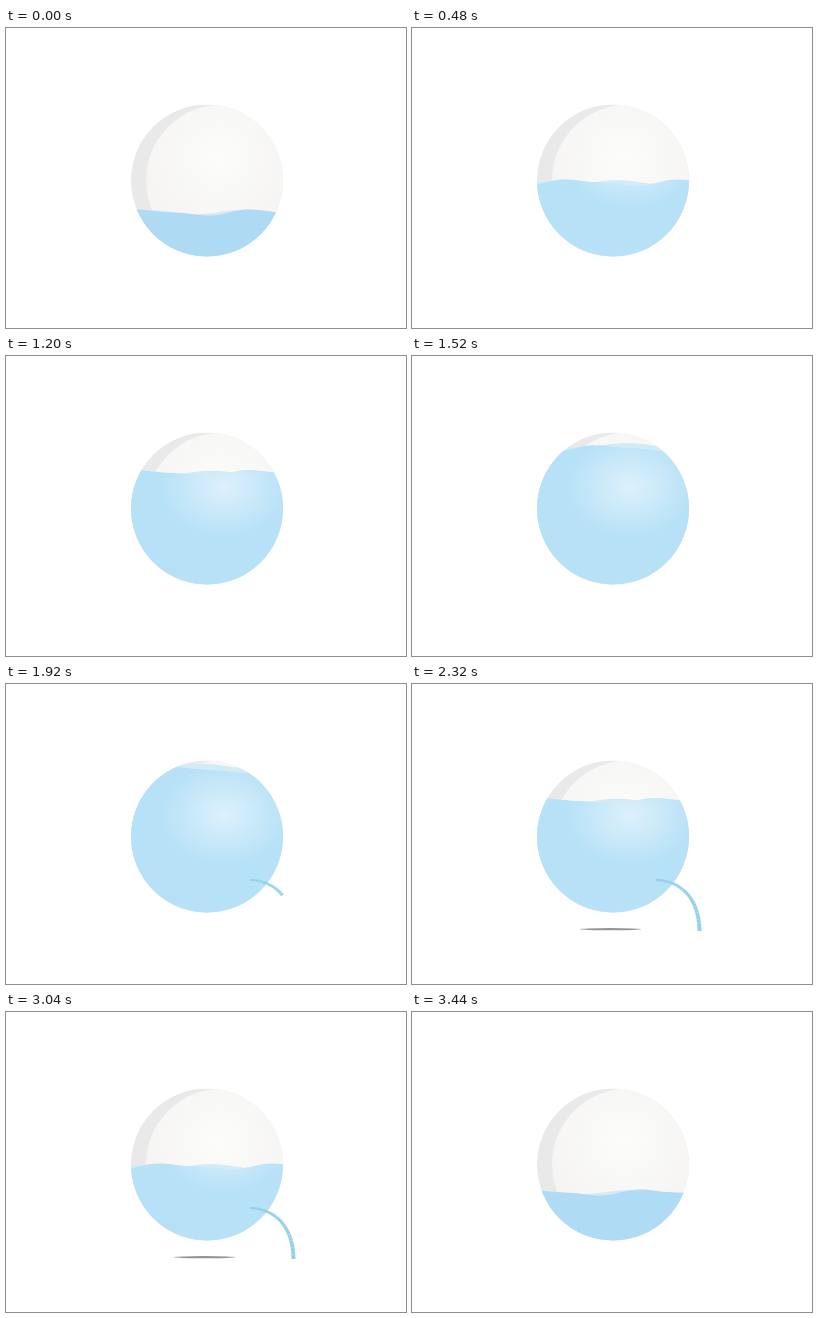
An HTML page with a canvas that plays this animation: 400x300 px, repeating every 3.52 s.

```html
<!DOCTYPE html>
<html lang="en">
<head>
<meta charset="utf-8">
<title>Filling globe</title>
<style>
  html, body { margin: 0; width: 100%; height: 100%; overflow: hidden; background: #fff; }
  canvas { display: block; width: 400px; height: 300px; }
</style>
</head>
<body>
<canvas id="stage" width="400" height="300"></canvas>
<script>
const ctx = document.getElementById('stage').getContext('2d');
const LOOP = 3520, STEP = 80;
const CX = 201, CY = 152.5, R = 76;
const LEVELS = [[0, 184.5], [80, 180.5], [480, 154.5], [1200, 117], [1600, 86], [1680, 78], [1760, 70]];

const clamp = (v) => Math.max(0, Math.min(1, v));
const mix = (a, b, k) => a + (b - a) * k;

function levelAt(p) {
  for (let i = 1; i < LEVELS.length; i++) {
    const [t0, y0] = LEVELS[i - 1], [t1, y1] = LEVELS[i];
    if (p <= t1) return mix(y0, y1, (p - t0) / (t1 - t0));
  }
  return LEVELS[LEVELS.length - 1][1];
}

function disc(x, y, r) {
  ctx.beginPath();
  ctx.arc(x, y, r, 0, Math.PI * 2);
}

function radial(x, y, r, inner, outer) {
  const g = ctx.createRadialGradient(x, y, 0, x, y, r);
  g.addColorStop(0, inner);
  g.addColorStop(1, outer);
  return g;
}

function waterPath(height) {
  ctx.beginPath();
  ctx.moveTo(CX - R - 2, CY + R + 2);
  for (let x = CX - R - 2; x <= CX + R + 2; x += 2) ctx.lineTo(x, height(x));
  ctx.lineTo(CX + R + 2, CY + R + 2);
  ctx.closePath();
}

function drawShell() {
  ctx.fillStyle = '#e9e9ea';
  ctx.fillRect(CX - R, CY - R, 2 * R, 2 * R);
  disc(CX + 15, CY, R);
  ctx.fillStyle = radial(212, 128, 85, '#fcfcfb', '#f5f4f3');
  ctx.fill();
}

function drawWater(p) {
  const level = levelAt(p);
  const front = (x) => {
    const a = 2 * Math.PI * (x - 195 + 0.1875 * p) / 112.5;
    return level + 2.6 * Math.cos(a) + 0.9 * Math.sin(2 * a);
  };
  const lift = 0.3 + 4 * clamp((p - 1300) / 300);
  const back = (x) => level - lift - 2 * Math.cos(2 * Math.PI * (x - 235 + 0.25 * p) / 90);

  waterPath(back);
  ctx.fillStyle = '#d3ebf6';
  ctx.fill();

  const k = clamp(p / 480);
  waterPath(front);
  ctx.fillStyle = `rgb(${mix(174, 183, k)}, ${mix(218, 225, k)}, ${mix(243, 247, k)})`;
  ctx.fill();

  // soft highlight, only where the water covers it
  ctx.save();
  ctx.clip();
  ctx.translate(218, 131);
  ctx.scale(1, 0.8);
  ctx.fillStyle = radial(0, 0, 64, 'rgba(255,255,255,.52)', 'rgba(255,255,255,0)');
  disc(0, 0, 64);
  ctx.fill();
  ctx.restore();
}

function jetPoint(u) {
  const v = 1 - u;
  const bez = (a, b, c, d) => v * v * v * a + 3 * v * v * u * b + 3 * v * u * u * c + u * u * u * d;
  return [bez(244, 262, 287, 287.5), bez(196, 196, 208, 247)];
}

function drawJet(t) {
  if (t < 1840 || t >= 3440) return;
  const end = Math.min(1, (t - 1780) / 240);
  const n = 28;
  ctx.strokeStyle = '#94d0ea';
  for (let i = 0; i < n; i++) {
    const a = end * i / n, b = end * (i + 1) / n;
    ctx.lineWidth = mix(2, 4, b);
    ctx.beginPath();
    ctx.moveTo(...jetPoint(a));
    ctx.lineTo(...jetPoint(b));
    ctx.stroke();
  }
}

function drawShadow(t) {
  if (t < 2080 || t >= 3440) return;
  ctx.beginPath();
  ctx.ellipse(198.5, 245.2, 30.5, 1.1, 0, 0, Math.PI * 2);
  ctx.fillStyle = '#929496';
  ctx.fill();
}

function draw(now) {
  const t = Math.floor((now % LOOP) / STEP) * STEP;
  ctx.clearRect(0, 0, 400, 300);
  drawShadow(t);
  ctx.save();
  disc(CX, CY, R);
  ctx.clip();
  drawShell();
  drawWater(Math.min(t, LOOP - t));
  ctx.restore();
  drawJet(t);
}

let start = null;
function tick(now) {
  if (start === null) start = now;
  draw(now - start);
  requestAnimationFrame(tick);
}
draw(0);
requestAnimationFrame(tick);
</script>
</body>
</html>
```
